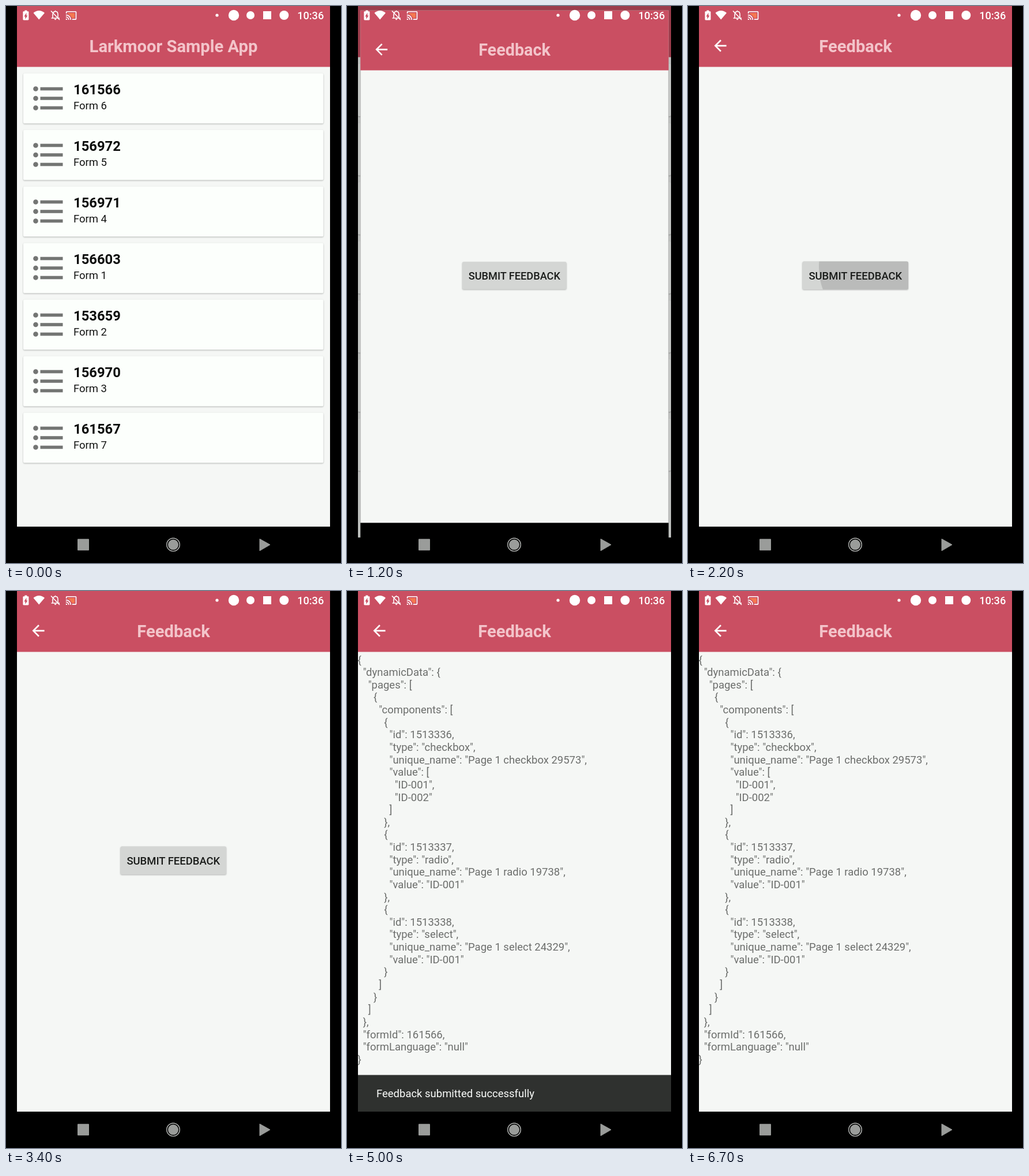
An HTML page for the animation above (8000 ms loop, 581 px wide and 965 px high).

```html
<!DOCTYPE html>
<html lang="en">
<head>
<meta charset="utf-8">
<title>Feedback form</title>
<style>
  html, body { margin: 0; width: 100%; height: 100%; overflow: hidden; background: #000; }
  svg { display: block; width: 100%; height: 100%; }
  text { font: 18.48px Roboto, sans-serif; white-space: pre; }
  .title { font-size: 29.2px; font-weight: 700; fill: #f3c4ca; text-anchor: middle; }
  .id { font-size: 23.76px; font-weight: 700; fill: #0b0c0b; }
  .caps { font-weight: 500; fill: #1a1c1a; text-anchor: middle; }
  .clock { font-size: 18.2px; font-weight: 500; text-anchor: end; }
  .json { fill: #6c6e6c; }
  .raised { filter: drop-shadow(0 1px 1px rgba(0, 0, 0, .28)); }
</style>
</head>
<body>
<svg viewBox="0 0 581 965">
  <defs>
    <clipPath id="screen"><rect x="19" width="543" height="965"/></clipPath>
    <clipPath id="buttonBox"><rect x="198.5" y="442.5" width="183.5" height="48.5" rx="2.5"/></clipPath>
    <g id="page">
      <rect x="19" width="543" height="965"/>
      <rect x="19" width="543" height="902" fill="#f5f7f5"/>
      <rect x="19" width="543" height="105.5" fill="#ca4f62"/>
    </g>
  </defs>

  <g clip-path="url(#screen)">
    <g id="list">
      <use href="#page"/>
      <text class="title" x="290.5" y="80">Larkmoor Sample App</text>
      <g id="cards"></g>
    </g>
    <rect id="dim" width="581" height="965"/>

    <g id="form">
      <use href="#page"/>
      <text class="title" x="290.5" y="80">Feedback</text>
      <path fill="#fff" transform="translate(40.2 53) scale(1.32)"
        d="M20 11H7.83l5.59-5.59L12 4l-8 8 8 8 1.41-1.41L7.83 13H20z"/>
      <g id="button">
        <rect class="raised" x="198.5" y="442.5" width="183.5" height="48.5" rx="2.5" fill="#d4d6d4"/>
        <g clip-path="url(#buttonBox)"><circle id="ripple" cx="341" cy="452"/></g>
        <text class="caps" x="290.3" y="473.5">SUBMIT FEEDBACK</text>
      </g>
      <g id="json" class="json"></g>
    </g>

    <g id="snack">
      <rect x="19" y="838.5" width="543" height="64" fill="#2f312f"/>
      <text id="message" x="51" y="877.3" fill="#fbfdfb">Feedback submitted successfully</text>
    </g>
    <rect id="navBar" x="19" y="902" width="543" height="63"/>
  </g>

  <!-- status bar -->
  <g fill="#fff">
    <path transform="translate(22.4 5.8) scale(1 .85)"
      d="M15.67 4H14V2h-4v2H8.33C7.6 4 7 4.6 7 5.33v15.33C7 21.4 7.6 22 8.33 22h7.33c.74 0 1.34-.6 1.34-1.33V5.33C17 4.6 16.4 4 15.67 4zM11 20v-5.5H9L13 7v5.5h2z"/>
    <path d="M47.5 12Q57.2 4 67 12L57.2 23.5z"/>
    <path d="M81 21V15q0-5 4.5-5.5T90 15v6M78.5 21H93M85.5 9.5V7.8M78 8.5L93 24" fill="none" stroke="#fff" stroke-width="1.6"/>
    <path d="M83.8 22.3h3.6q-.3 2-1.8 2t-1.8-2z"/>
    <g transform="translate(103 6.4) scale(.84)">
      <path fill="#f5784f" d="M19 7H5v1.63c3.96 1.28 7.09 4.41 8.37 8.37H19z"/>
      <path d="M1 18v3h3c0-1.66-1.34-3-3-3zm0-4v2c2.76 0 5 2.24 5 5h2c0-3.87-3.13-7-7-7zm0-4v2c4.97 0 9 4.03 9 9h2c0-6.08-4.93-11-11-11zm20-7H3c-1.1 0-2 .9-2 2v3h2V5h18v14h-7v2h7c1.1 0 2-.9 2-2V5c0-1.1-.9-2-2-2z"/>
    </g>
    <circle cx="366" cy="16" r="2.6"/>
    <circle cx="395" cy="16" r="9.2"/>
    <circle cx="424" cy="16" r="7"/>
    <rect x="446" y="9" width="14" height="14"/>
    <circle cx="482.3" cy="16" r="8"/>
    <text class="clock" x="551.3" y="23">10:36</text>
  </g>

  <!-- navigation bar -->
  <g fill="#9a9c9a">
    <rect x="124" y="923.3" width="20" height="20" rx="1"/>
    <circle cx="290" cy="933.3" r="9"/>
    <circle cx="290" cy="933.3" r="11.3" fill="none" stroke="#b4b6b4" stroke-width="1.4"/>
    <path d="M440 923.3L458 933.3 440 943.8z" stroke="#9a9c9a" stroke-linejoin="round"/>
  </g>
</svg>

<script>
const $ = id => document.getElementById(id);
const show = (id, on) => $(id).style.display = on ? '' : 'none';
const set = (id, name, value) => $(id).setAttribute(name, value);

const forms = [[161566, 6], [156972, 5], [156971, 4], [156603, 1], [153659, 2], [156970, 3], [161567, 7]];
$('cards').innerHTML = forms.map(([id, n], i) => `
  <g transform="translate(0 ${i * 98})">
    <rect class="raised" x="30" y="116.5" width="520.5" height="87" rx="2.6" fill="#fcfffc"/>
    ${[143.5, 160, 176.5].map(y => `<g fill="#737573">
      <circle cx="51.5" cy="${y}" r="4.3"/>
      <rect x="59.5" y="${y - 2.8}" width="39" height="5.6"/></g>`).join('')}
    <text class="id" x="117" y="152.5">${id}</text>
    <text x="117" y="179" fill="#131413">Form ${n}</text>
  </g>`).join('');

const part = (id, type, code, value) => ({ id, type, unique_name: `Page 1 ${type} ${code}`, value });
const data = {
  dynamicData: {
    pages: [{
      components: [
        part(1513336, 'checkbox', 29573, ['ID-001', 'ID-002']),
        part(1513337, 'radio', 19738, 'ID-001'),
        part(1513338, 'select', 24329, 'ID-001')
      ]
    }]
  },
  formId: 161566,
  formLanguage: 'null'
};
$('json').innerHTML = JSON.stringify(data, null, 2).split('\n').map((line, i) =>
  `<text x="18.5" y="${125.6 + i * 21.63}" xml:space="preserve">${line}</text>`).join('');

const zoom = s => `translate(290.5 482.5) scale(${s}) translate(-290.5 -482.5)`;

function draw(time) {
  const tick = Math.floor(time % 8000 / 100);

  // list to form: both pages grow, the list is dimmed
  const open = tick - 11;
  const p = open < 0 ? 0 : open > 3 ? 1 : 1 - .5 * .21 ** open;
  show('list', p < 1);
  show('form', p > 0);
  set('list', 'transform', zoom(1 + .05 * p));
  set('form', 'transform', zoom(.85 + .15 * p));
  set('form', 'opacity', open === 0 ? .85 : 1);
  set('dim', 'opacity', p < 1 ? .25 * p : 0);
  show('navBar', p === 0 || p === 1);

  // press on the button
  const press = tick - 22;
  show('ripple', press >= 0 && press < 3);
  set('ripple', 'r', 114 + Math.max(0, press) * 80);
  set('ripple', 'opacity', .127 * (1 - press / 3));

  // message slides in, later out
  const enter = Math.min(1, Math.max(0, (tick - 34) / 3));
  const leave = Math.min(1, Math.max(0, (tick - 64) / 3));
  const up = 1 - (1 - enter) ** 3 - leave * leave * (3 - 2 * leave);
  show('snack', up > 0);
  set('snack', 'transform', `translate(0 ${64 * (1 - up)})`);
  set('message', 'opacity', Math.min(1, enter * 1.3) * (1 - leave));

  show('button', tick < 50);
  show('json', tick >= 50);
}

const start = performance.now();
(function frame() {
  draw(performance.now() - start);
  requestAnimationFrame(frame);
})();
</script>
</body>
</html>
```
